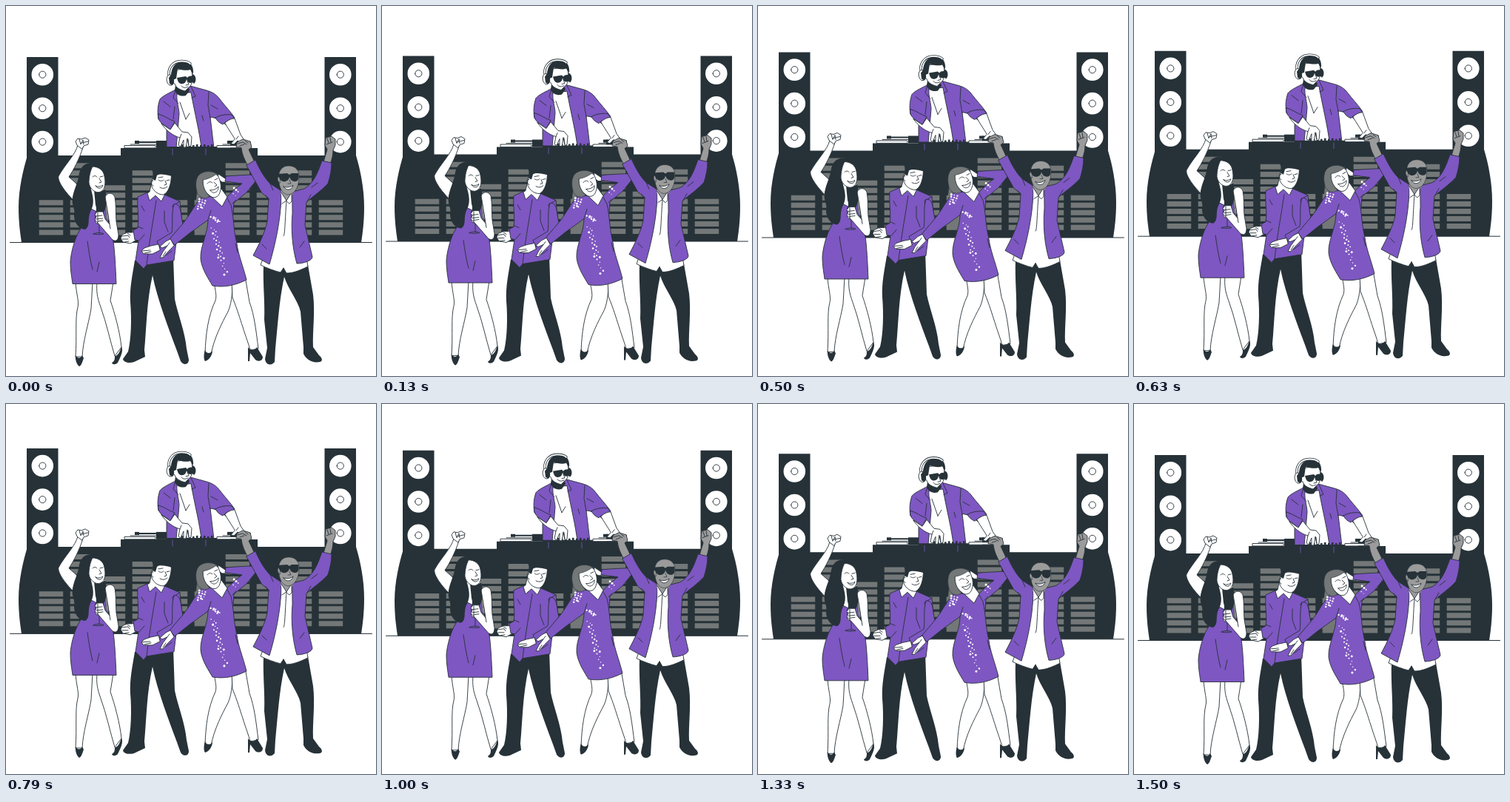
Animation of 500 by 500 pixels, one loop 1540 ms. Source, as an HTML page with a canvas:

```html
<!DOCTYPE html>
<html lang="en">
<head>
<meta charset="utf-8">
<title>Dance party</title>
<style>
html, body { margin: 0; width: 100%; height: 100%; overflow: hidden; background: #fff; }
canvas { display: block; width: 500px; height: 500px; }
</style>
</head>
<body>
<canvas id="stage"></canvas>
<script>
const canvas = document.getElementById('stage');
const ctx = canvas.getContext('2d');
const ratio = window.devicePixelRatio || 1;
canvas.width = canvas.height = 500 * ratio;

const DARK = '#263238', PURPLE = '#7e57c2', GREY = '#737777', SKIN = '#9b9b9b', WHITE = '#fff';
const LOOP = 1540, PEAK = 740, RISE = 9.8, SPEED = 0.0137;

const shapes = [];
const shape = (d, fill, stroke = DARK, width = 0.9) =>
  shapes.push({ path: new Path2D(d), fill, stroke, width });
const flat = (d, fill) => shape(d, fill, null);
const line = (d, width = 0.9, color = DARK) => shape(d, null, color, width);
const rect = (x, y, w, h, fill) => flat(`M${x} ${y}h${w}v${h}h${-w}z`, fill);
const disc = (x, y, r, fill, stroke = null) =>
  shape(`M${x - r} ${y}a${r} ${r} 0 1 0 ${2 * r} 0a${r} ${r} 0 1 0 ${-2 * r} 0z`, fill, stroke);

function buildStage() {
  line('M5.5 319.5H494.5', 1);
  for (const x of [28, 430.5]) {
    rect(x, 69, 42.5, 140, DARK);
    for (const y of [92.7, 138.2, 183.6]) {
      disc(x + 21.3, y, 14.8, WHITE);
      disc(x + 21.3, y, 4.6, WHITE, DARK);
    }
  }
  flat('M29 202H473C479 222 484 247 484 272C484 292 482 306 480 319.5H21C19 306 17 292 17 272C17 247 23 222 29 202Z', DARK);
  const rows = [5, 10, 7, 9, 5, 5, 10, 6, 9, 5];
  rows.forEach((count, col) => {
    for (let i = 0; i < count; i++) rect(44.7 + col * 42, 302.4 - i * 10.03, 32.5, 7, GREY);
  });
}

function buildDj() {
  // jacket and shirt
  shape('M229 113C222 117 212 121 208 126C204 137 205 147 206 153L217 162V192H281L276 150L285 152L298 161L309 151C303 142 295 134 289 126C284 119 278 116 271 114L249 108Z', PURPLE);
  shape('M231 119C230 129 234 138 234 146L230 192H264C262 172 255 145 250 117Z', WHITE);
  line('M229 113L226 124L233 132M250 109L256 122L251 124M213 129L222 136M228 136L226 153M274 116L273 134L276 151M277 134L286 139M235 130L243 153M248 145L243 153M265 148L267 155');
  shape('M206 146C204 151 208 158 214 161L222 167L228 156C221 154 214 148 206 146Z', PURPLE);
  shape('M283 151C289 147 299 146 305 147L309 152C302 153 297 156 293 160C288 158 285 155 283 151Z', PURPLE);
  // head
  flat('M229 107L228 114C230 120 236 123 243 121L248 114L245 106Z', DARK);
  shape('M225 87L249 84C253 91 253 104 249 108L242 115C235 113 230 111 228 105L223 101Z', WHITE);
  flat('M223 101C222 85 227 75 240 75C250 75 254 82 253 92L249 86C243 88 237 86 232 85L230 98Z', DARK);
  line('M221 97C217 85 225 74.5 237 74.5C242 74.5 246 75 249 78', 3.4);
  line('M221 97C217 85 225 74.5 237 74.5C242 74.5 246 75 249 78', 1.8, WHITE);
  shape('M220 93C216 95 216 104 221 107L224 107V94Z', WHITE);
  flat('M223 93C227 95 229 104 225 107L221 105L220 97Z', DARK);
  flat('M252 92C257 93 258 102 254 105L250 101Z', DARK);
  flat('M231 97L243 95L245 97L247 95L254 94C256 100 253 104 249 104C246 104 245 101 244 99C243 104 240 106 236 105C233 104 232 101 231 97Z', DARK);
  line('M245 101L247 106L243 107M237 108C239 111 243 111 246 109');
  // mixing desk
  rect(155, 192, 185, 12, DARK);
  rect(203, 182, 14, 10, DARK);
  rect(303, 182, 14, 10, DARK);
  for (const x of [160, 285]) {
    shape(`M${x} 191.5v-3h42v3z`, WHITE);
    line(`M${x + 8} 187h37`);
    line(`M${x + 16} 184h29`, 2);
    rect(x + 14, 182, 6, 4, DARK);
  }
  rect(217, 190, 68, 3, DARK);
  for (let i = 0; i < 9; i++) rect(237 + i * 5, 187 + i % 2, 2.5, 5, DARK);
  line('M225 193V201M270 193V201', 0.8, PURPLE);
  // forearms
  shape('M210 159L222 167L228 158L238 170L246 171L251 177L250 189L247 190L245 179L243 191L240 191L240 181L236 190L233 188L235 178C225 175 216 168 210 159Z', WHITE);
  shape('M296 158C299 155 304 152 309 152L317 174L322 181L319 187L313 182L308 187L304 186L309 180Z', WHITE);
  line('M237 173L235 178M246 180L247 188M311 180L314 176');
}

function buildWineDancer() {
  // raised arm
  shape('M97 188C94 201 79 215 71 230C69 237 82 254 93 264L104 248L85 231C91 222 99 207 104 191Z', WHITE);
  shape('M96 188L94 183L97 179L102 180L107 178L112 181L111 187L105 189L103 193Z', WHITE);
  line('M99 180L101 187L104 181L105 187M102 185L111 183');
  // legs
  shape('M94 373C95 390 99 399 97 407C93 422 96 445 94 474H103C104 452 112 428 115 409L117 373Z', WHITE);
  shape('M123 373C122 386 123 393 128 407C136 429 140 450 147 473L156 461C154 441 147 415 141 398L145 373Z', WHITE);
  flat('M94 472C96 476 101 477 103 472L105 476C103 481 102 486 99 487C96 485 93 478 94 472Z', DARK);
  flat('M147 473C151 473 154 467 156 460C159 466 155 474 151 482C148 485 144 485 143 482C147 480 147 477 147 473Z', DARK);
  // neck, dress and hair
  flat('M108 247H134L138 300H101Z', WHITE);
  shape('M107 270C104 286 105 296 99 304C93 314 88 332 87 345C87 358 89 367 90 375.5H149C148 352 147 332 145 318C139 304 134 287 135 264L127 280Z', PURPLE);
  line('M110 318C112 332 114 345 117 356M126 346L123 359');
  flat('M121 212C110 211 102 214 99 226C97 240 93 244 90 258C88 270 94 273 92 283C92 293 99 302 107 302C115 297 109 287 115 276C121 264 116 253 114 244L132 225C131 216 127 213 121 212Z', DARK);
  flat('M119 249C124 254 130 250 134 247C137 258 137 270 132 279C129 287 125 289 122 286C119 281 124 276 121 269Z', DARK);
  shape('M117 217C125 217 132 222 133 230C135 239 134 248 128 251C121 254 113 247 112 239C112 231 114 222 117 217Z', WHITE);
  line('M117 231C119 229 121 229 123 231M127 231L131 230M126 233L129 238L126 239');
  shape('M121 243C124 245 128 244 131 242C130 247 124 248 121 243Z', WHITE);
  // glass and arm
  shape('M121 279H132L131 292C129 296 123 296 121 292Z', WHITE);
  line('M126 295V307M118 308C122 306 129 306 132 308C127 309 122 309 118 308');
  shape('M134 258C136 252 144 251 147 258C149 268 148 279 149 291L152 309C152 316 149 319 144 316L124 293L120 289L122 285L120 282L123 278L131 278L134 288L140 295C138 282 136 270 134 258Z', WHITE);
  line('M121 284L130 283M122 288L131 287M124 291L131 290M124 279V294M140 295L141 301');
}

function buildShirtDancer() {
  flat('M174 344C171 363 167 380 168 400C170 424 169 450 165 467L158 477C159 482 167 483 173 481L188 474L187 465C190 433 190 400 198 364C205 398 220 436 231 466L236 480C240 486 247 485 247 478L244 463C242 440 232 416 228 396L226 338Z', DARK);
  // fist and shirt
  shape('M178 302L171 306L164 306L157 309L155 314L158 319L168 321L175 317L180 314Z', WHITE);
  line('M157 311L165 310L167 313M157 315L165 315M160 319L166 318M164 307L168 310');
  shape('M191 252L178 258C177 273 180 288 178 300L172 303L174 316L179 317L175 344L186 355L190 350L227 344L230 319L239 305L235 264L212 254Z', PURPLE);
  line('M203 263C199 290 193 321 190 350M178 298L185 301M180 317L187 309M235 264L225 270L229 297M216 337L224 331M214 277L214 292L219 305M183 270L187 277');
  shape('M227 268C233 266 236 272 237 284L240 300C240 309 234 314 226 317L207 326L204 318L224 306C226 295 223 279 227 268Z', PURPLE);
  shape('M206 322L196 324L187 327L183 331L186 335L198 335L208 330Z', WHITE);
  line('M184 331L195 330M187 334L196 332');
  // head
  shape('M196 242L194 251L191 253L194 263L202 256L210 264L214 256L213 247Z', WHITE);
  shape('M200 225C198 233 196 239 197 244C200 251 206 255 213 255C219 252 222 243 223 235L224 223Z', WHITE);
  flat('M196 219L202 221L206 219L222 221L225 224L224 230C216 228 208 226 204 229L202 236L198 234C199 228 199 224 196 219Z', DARK);
  line('M206 235C208 237 211 237 213 235M217 236L221 235M215 236L217 241L214 242M208 245C211 247 215 247 218 244M199 236C195 234 195 242 199 243M206 232L212 231');
}

function buildSequinDancer() {
  // legs
  shape('M281 372C283 386 285 391 283 398C273 419 270 443 269 469L277 471C281 449 292 428 300 413C304 404 306 392 306 373Z', WHITE);
  shape('M305 372L306 394C313 411 316 422 320 434C324 447 328 457 330 465L341 463C338 440 336 419 329 400L323 365Z', WHITE);
  flat('M269 465C271 470 276 470 279 466C279 472 274 479 269 480C267 478 267 470 269 465Z', DARK);
  flat('M327 461C331 466 336 466 339 461L347 474C347 480 341 481 337 478L330 469L329 480H327Z', DARK);
  // hair behind the body
  flat('M258 248C258 265 253 281 252 299C255 309 266 311 273 306L282 268Z', GREY);
  // bent arm and dress
  shape('M296 233L287 227L285 233L292 238L300 238Z', WHITE);
  shape('M293 270C294 260 303 254 311 246L319 240L296 237L297 230C311 229 325 228 337 228C342 229 341 233 338 236L325 252L308 266L307 282Z', PURPLE);
  shape('M265 258C256 266 249 282 239 294L221 315L228 323L248 307L273 289C273 307 262 325 263 342C265 357 274 369 279 378C296 381 311 377 325 370C320 350 314 337 312 321C307 300 308 286 304 269L298 258Z', PURPLE);
  shape('M276 256L292 271L299 258L291 247Z', WHITE);
  line('M273 289L277 276M306 267L311 262M310 321L313 333');
  shape('M222 315L216 318L208 325L211 327L218 324L212 332L208 340L212 340L219 332L227 324Z', WHITE);
  line('M218 324L221 320M216 332L212 338');
  // head
  shape('M267 229L284 226C290 234 292 244 289 252C287 259 280 261 275 256C268 251 264 242 267 229Z', WHITE);
  shape('M287 229C281 222 268 222 261 228C255 234 256 246 259 254C264 261 271 261 275 257C268 250 266 243 266 235C273 234 279 231 283 228Z', GREY, DARK, 0.6);
  line('M272 240C274 237 277 237 279 239M282 235L286 233M281 238L285 242L282 244');
  shape('M276 249C281 249 285 247 287 244C288 251 280 256 276 249Z', WHITE);
  // sequins scattered along short trails
  let seed = 7;
  const random = () => (seed = seed * 16807 % 2147483647) / 2147483647;
  const trail = (count, x0, y0, x1, y1, spread) => {
    for (let i = 0; i < count; i++) {
      const k = i / (count - 1);
      const side = (i % 3 - 1) * spread / 3 + (random() - 0.5) * 2;
      disc(x0 + (x1 - x0) * k + side, y0 + (y1 - y0) * k, 0.6 + random(), WHITE);
    }
  };
  trail(13, 266, 261, 262, 274, 11);
  trail(10, 279, 285, 288, 292, 8);
  trail(18, 280, 300, 291, 341, 8);
  trail(7, 290, 340, 298, 363, 7);
  trail(5, 310, 246, 311, 256, 8);
}

function buildBaldDancer() {
  flat('M348 350C347 377 350 399 349 424L353 462L350 477C351 485 358 487 363 481L364 463C367 434 369 398 376 366C381 382 395 399 398 413L402 461L402 470C406 478 414 483 424 481C429 480 427 475 423 472L415 461C414 440 418 415 415 390L408 350Z', DARK);
  // raised forearms
  shape('M318 192C319 201 323 209 327 216L336 211L328 194L332 191L330 183L320 180L312 184L311 190Z', SKIN);
  shape('M434 194L428 214L438 214C441 206 442 200 442 195L445 188L445 180L440 176L432 178L431 188Z', SKIN);
  line('M313 186L320 184L325 187M316 189L322 187M323 182L327 185M434 179L436 185M438 178L439 184M433 187L441 184');
  // shirt
  shape('M372 252L359 272L355 320L344 350C352 354 363 358 371 360L375 354L379 361C389 361 400 356 408 352L399 300L393 263L386 252Z', WHITE);
  line('M379 263C377 289 377 312 375 311M375 354L376 362');
  // jacket
  shape('M325 215L337 208C342 219 348 231 357 240L371 249L372 258C371 290 364 322 356 349L334 337C342 322 350 306 353 291L355 260L346 253Z', PURPLE);
  shape('M387 251L403 247C416 239 421 226 427 209L440 212C440 221 438 231 435 240C427 249 415 257 406 265L404 296L414 339C414 344 402 348 393 348C387 327 385 303 387 280Z', PURPLE);
  line('M357 240L361 249M355 262L351 256M407 264L412 255M397 326L403 318M346 322L352 328M413 245L421 239');
  // head
  flat('M372 246L371 254L379 264L388 254V246Z', SKIN);
  shape('M372 252L379 263L373 267M379 263L386 252L386 264L383 267Z', WHITE);
  shape('M369 226C371 219 376 216 382 216C391 216 396 222 396 230C396 242 392 254 381 255C374 254 370 247 369 239Z', SKIN, DARK, 0.6);
  shape('M370 231C366 229 366 237 370 239Z', SKIN, DARK, 0.6);
  flat('M367 227L380 226L383 228L386 226L395 226C397 234 394 238 389 237C385 236 384 233 383 231C382 236 378 238 374 237C370 236 369 231 367 227Z', DARK);
  shape('M375 244C379 246 385 245 388 242C387 248 379 251 375 244Z', WHITE);
  line('M383 235L385 240L381 240', 0.7);
}

buildStage();
buildDj();
buildWineDancer();
buildShirtDancer();
buildSequinDancer();
buildBaldDancer();

function draw(now) {
  const t = now % LOOP;
  const lift = Math.max(0, RISE - Math.abs(t - PEAK) * SPEED);
  ctx.setTransform(ratio, 0, 0, ratio, 0, 0);
  ctx.fillStyle = WHITE;
  ctx.fillRect(0, 0, 500, 500);
  ctx.translate(0, -lift);
  ctx.lineCap = ctx.lineJoin = 'round';
  for (const { path, fill, stroke, width } of shapes) {
    if (fill) {
      ctx.fillStyle = fill;
      ctx.fill(path);
    }
    if (stroke) {
      ctx.strokeStyle = stroke;
      ctx.lineWidth = width;
      ctx.stroke(path);
    }
  }
}

const start = performance.now();
function tick() {
  draw(performance.now() - start);
  requestAnimationFrame(tick);
}
tick();
</script>
</body>
</html>
```
